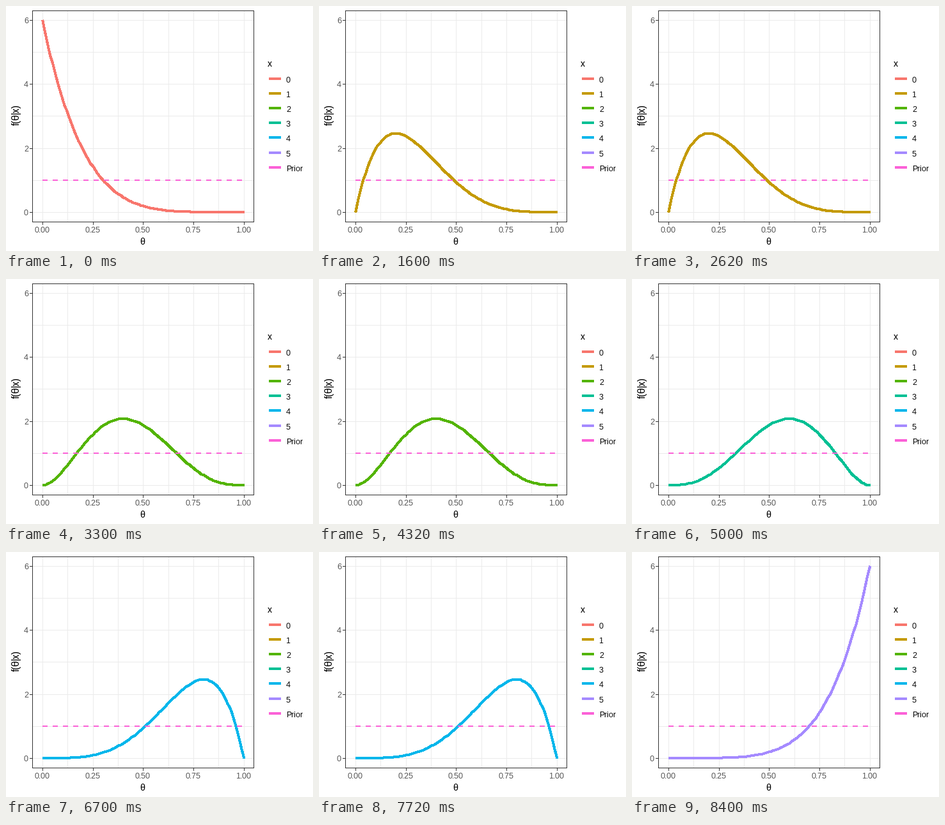
A matplotlib script that plays this animation: 480 by 384 pixels, repeating every 10000 ms.

```python
import math

import matplotlib.pyplot as plt
import numpy as np
from matplotlib.animation import FuncAnimation

plt.rcParams.update({
    "font.family": "Liberation Sans",
    "text.hinting": "native",
    "text.hinting_factor": 1,
})

W, H, DPI = 480, 384, 96
PT = 72 / DPI  # points per pixel
STEP = 100  # ms per frame
CHANGES = [16, 33, 50, 67, 84]

COLORS = ["#F8766D", "#C49A00", "#53B400", "#00C094",
          "#00B6EB", "#A58AFF", "#FB61D7"]
LABELS = ["0", "1", "2", "3", "4", "5", "Prior"]
GRID, DARK, TICK_TEXT = "#EBEBEB", "#333333", "#4D4D4D"
LEFT, RIGHT, TOP, BOTTOM = 41, 387, 7, 338

fig = plt.figure(figsize=(W / DPI, H / DPI), dpi=DPI, facecolor="white")
ax = fig.add_axes([0, 0, 1, 1])
ax.set_xlim(0, W)
ax.set_ylim(H, 0)
ax.axis("off")


def px(theta):
    return np.floor(56.8 + 314.8 * np.asarray(theta) + 0.5)


def py(density):
    return np.floor(322.9 - 50.15 * np.asarray(density) + 0.5)


def stroke(x, y, color, width=1, z=1, **kw):
    return ax.plot(x, y, color=color, lw=width * PT, zorder=z, snap=False,
                   solid_capstyle="butt", dash_capstyle="butt",
                   solid_joinstyle="round", **kw)[0]


def hline(x0, x1, y, color, z=1):
    stroke([x0, x1], [y + 0.5, y + 0.5], color, z=z)


def vline(x, y0, y1, color, z=1):
    stroke([x + 0.5, x + 0.5], [y0, y1], color, z=z)


def label(x, y, text, size, color="black", **kw):
    ax.text(x, y, text, fontsize=size * PT, color=color, zorder=6,
            **{"ha": "left", "va": "baseline", **kw})


# grid, ticks and tick labels
for i in range(9):
    x = px(i / 8)
    vline(x, TOP, BOTTOM, GRID)
    if i % 2 == 0:
        vline(x, BOTTOM + 1, BOTTOM + 5, DARK)
        label(x - 0.5, 355, f"{i / 8:.2f}", 12, TICK_TEXT, ha="center")
for i in range(7):
    y = py(i)
    hline(LEFT, RIGHT, y, GRID)
    if i % 2 == 0:
        hline(LEFT - 4, LEFT, y, DARK)
        label(35, y + 5, str(i), 12, TICK_TEXT, ha="right")

# panel border
for y in (TOP, BOTTOM):
    hline(LEFT, RIGHT + 1, y, DARK, z=5)
for x in (LEFT, RIGHT):
    vline(x, TOP, BOTTOM + 1, DARK, z=5)

# titles
label(213.5, 374, "θ", 15, ha="center")
label(24, 170.5, "f(θ|x)", 16, rotation=90, ha="right", va="center")
label(409, 95, "x", 15)

# legend
for i, (name, color) in enumerate(zip(LABELS, COLORS)):
    y = math.floor(114.82 + 23.04 * i)
    stroke([411, 430], [y, y], color, 4)
    label(438, y + 6, name, 12)

# densities; the hard-edged curve fills every pixel it touches,
# so a width of 3 shows as 4
theta = np.linspace(0, 1, 101)
curve = stroke([], [], COLORS[0], 3, z=3, antialiased=False)
stroke(px([0, 1]), py([1, 1]), COLORS[-1], 2, z=4, linestyle=(0, (4, 4)))


def posterior(x):
    return 6 * math.comb(5, x) * theta**x * (1 - theta)**(5 - x)


def update(frame):
    x = sum(frame >= c for c in CHANGES)
    curve.set_data(px(theta) + 0.25, py(posterior(x)) + 0.25)
    curve.set_color(COLORS[x])
    return [curve]


anim = FuncAnimation(fig, update, frames=100, interval=STEP,
                     repeat=True, repeat_delay=0)
plt.show()
```
